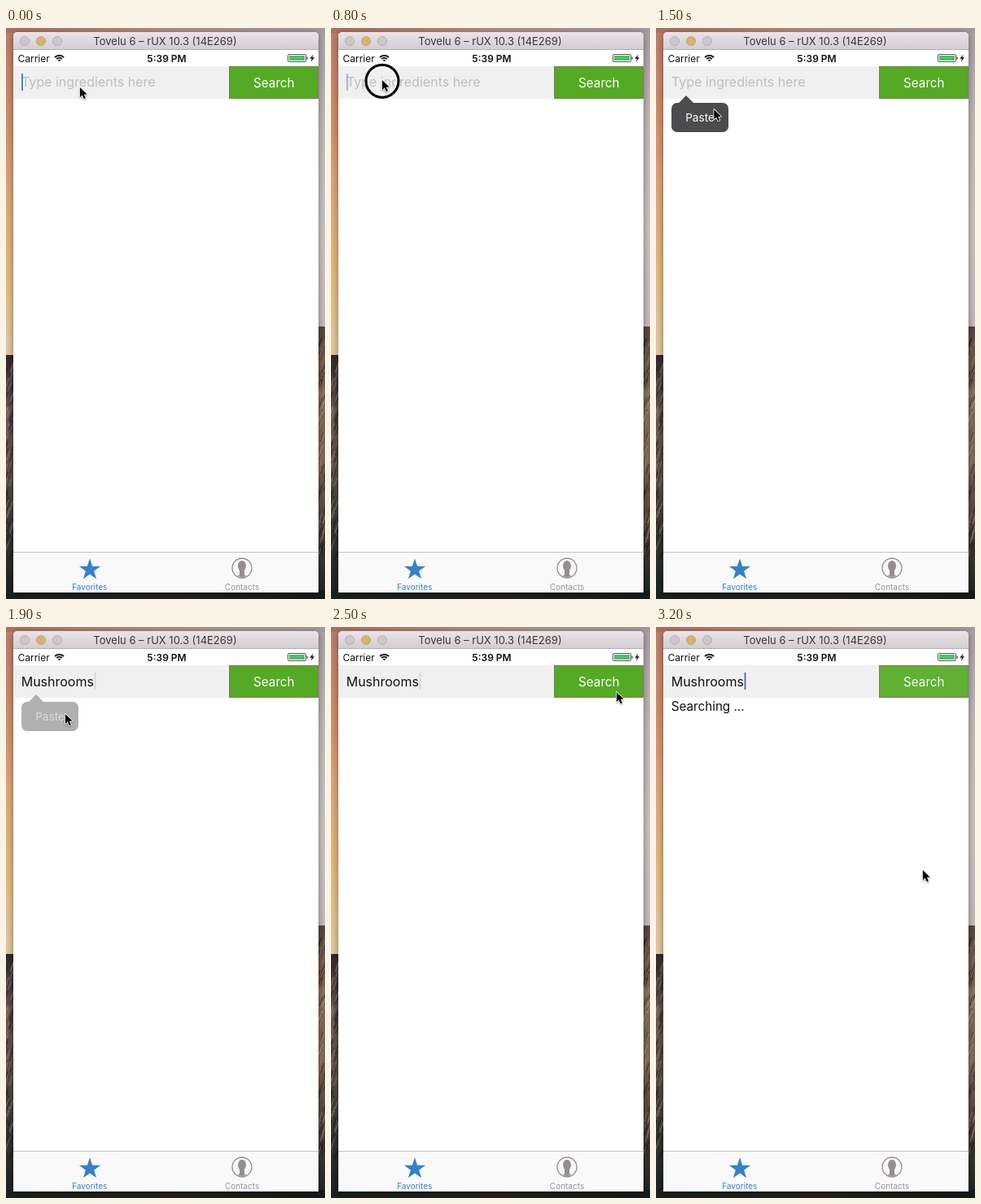
Recreate the animation shown at these times as an HTML page with a canvas. Size 392 by 702 pixels, loop 3300 ms.

```html
<!DOCTYPE html>
<html lang="en">
<head>
<meta charset="utf-8">
<title>Ingredient search</title>
<style>
  html, body { margin: 0; width: 100%; height: 100%; overflow: hidden; background: #fff; }
  canvas { display: block; width: 392px; height: 702px; }
</style>
</head>
<body>
<canvas id="stage"></canvas>
<script>
const W = 392, H = 702, LOOP = 3300, STEP = 100, TAU = Math.PI * 2;
const FONT = 'Inter, Roboto, "Liberation Sans", sans-serif';
const INK = '#111', BLUE = '#3581c8', GREY = '#958e8e';

// Moments of the story, in ms
const TAP = 800, MENU_IN = 1000, PASTE = 1900, PRESS = 2800, RESULT = 3000;

const dpr = window.devicePixelRatio || 1;
const canvas = document.getElementById('stage');
const base = document.createElement('canvas');
for (const c of [canvas, base]) {
  c.width = W * dpr;
  c.height = H * dpr;
}
const ctx = canvas.getContext('2d');

const clamp = v => Math.min(1, Math.max(0, v));
const ramp = (t, from, to) => clamp((t - from) / (to - from));
const ease = v => v * v * (3 - 2 * v);

function random(seed) {
  return () => (seed = seed * 16807 % 2147483647) / 2147483647;
}

function rect(c, color, x, y, w, h) {
  c.fillStyle = color;
  c.fillRect(x, y, w, h);
}

function round(c, color, x, y, w, h, r) {
  c.beginPath();
  c.roundRect(x, y, w, h, r);
  c.fillStyle = color;
  c.fill();
}

function disc(c, color, x, y, r) {
  c.beginPath();
  c.arc(x, y, r, 0, TAU);
  c.fillStyle = color;
  c.fill();
}

function ring(c, color, x, y, r, width) {
  c.beginPath();
  c.arc(x, y, r, 0, TAU);
  c.strokeStyle = color;
  c.lineWidth = width;
  c.stroke();
}

function poly(c, color, pts) {
  c.beginPath();
  pts.forEach(([x, y]) => c.lineTo(x, y));
  c.closePath();
  c.fillStyle = color;
  c.fill();
}

function text(c, str, x, y, size, color, align = 'left', weight = 400) {
  c.font = `${weight} ${size}px ${FONT}`;
  c.textAlign = align;
  c.fillStyle = color;
  c.fillText(str, x, y);
}

// Evenly spaced colours from one point to another
function blend(c, x0, y0, x1, y1, colors) {
  const g = c.createLinearGradient(x0, y0, x1, y1);
  colors.forEach((color, i) => g.addColorStop(i / (colors.length - 1), color));
  return g;
}

function side(c, x, horizon, sky, rock, rnd) {
  rect(c, blend(c, 0, 0, 0, horizon, sky), x, 0, W / 2, horizon);
  rect(c, blend(c, 0, horizon, 0, H, rock), x, horizon, W / 2, H - horizon);
  const edge = x ? 384 : 0;
  c.lineWidth = 1.4;
  for (let i = 0; i < 70; i++) {
    const sx = edge + rnd() * 8, sy = horizon + 12 + rnd() * (640 - horizon);
    c.strokeStyle = rnd() < .5 ? 'rgba(25,20,22,.45)' : 'rgba(190,165,140,.35)';
    c.beginPath();
    c.moveTo(sx - 2, sy + 7);
    c.lineTo(sx + 2, sy - 5);
    c.stroke();
  }
}

function wallpaper(c) {
  const rnd = random(41);
  side(c, 0, 402, ['#bb7c6c', '#cf8c68', '#e0a778', '#e4ba7c', '#e3c9a4'],
    ['#2f282a', '#665950', '#5a4f46', '#343630', '#17201f'], rnd);
  side(c, W / 2, 367, ['#aaa0a4', '#c4b9bb', '#cdc2c4', '#c6babd'],
    ['#55463f', '#846a56', '#7b6554', '#4a4038', '#1b2422'], rnd);
  rect(c, blend(c, 0, 0, W, 0, ['#a9705f', '#b08e84', '#a39a9e']), 0, 0, W, 6);
  rect(c, blend(c, 0, 0, W, 0, ['#18221f', '#25231f', '#141c1b']), 0, 692, W, 10);
}

function windowFrame(c) {
  const corners = [5, 5, 0, 0];
  c.save();
  c.shadowColor = 'rgba(0,0,0,.42)';
  c.shadowBlur = 8 * dpr;
  c.shadowOffsetY = 2 * dpr;
  round(c, '#fff', 9, 5, 375, 689, corners);
  c.restore();
  round(c, blend(c, 0, 5, 0, 27, ['#ebe4e9', '#d2ccd1']), 9, 5, 375, 22, corners);
  rect(c, '#b5afb3', 9, 26, 375, 1);
  ['#cdc6cb', '#d7b369', '#cdc6cb'].forEach((color, i) => {
    disc(c, color, 23 + i * 20, 16, 5.6);
    ring(c, 'rgba(90,75,80,.25)', 23 + i * 20, 16, 5.6, 1);
  });
  text(c, 'Tovelu 6 – rUX 10.3 (14E269)', 195.5, 21, 13, '#3a373a', 'center');
}

function statusBar(c) {
  text(c, 'Carrier', 14.5, 41.5, 12, INK);
  text(c, '5:39 PM', 197.5, 41.5, 12, INK, 'center', 600);

  c.strokeStyle = INK;
  c.lineWidth = 1.9;
  for (const r of [1.6, 4.7, 7.8]) {
    c.beginPath();
    c.arc(65.5, 41.5, r, TAU * .625, TAU * .875);
    c.stroke();
  }

  c.lineWidth = 1;
  c.strokeStyle = '#4d5a50';
  c.beginPath();
  c.roundRect(346.5, 32.5, 22, 9, 1.5);
  c.stroke();
  rect(c, '#50bd6a', 348, 34, 19, 6);
  rect(c, '#333', 369.5, 35.5, 1.2, 3);
  poly(c, INK, [[377.5, 32.5], [373.3, 37.8], [375.9, 37.8], [374.7, 41.8], [379, 36.3], [376.4, 36.3]]);
}

function tabBar(c) {
  rect(c, '#f9f9fa', 9, 644, 375, 50);
  rect(c, '#c3c1c3', 9, 644, 375, 1);

  const star = Array.from({ length: 10 }, (_, i) => {
    const a = i * TAU / 10, r = i % 2 ? 5.4 : 13.8;
    return [103 + r * Math.sin(a), 666 - r * Math.cos(a)];
  });
  poly(c, BLUE, star);
  text(c, 'Favorites', 102.7, 690.5, 10, BLUE, 'center');

  ring(c, GREY, 290, 664, 12, 1.3);
  c.save();
  c.beginPath();
  c.arc(290, 664, 11, 0, TAU);
  c.clip();
  c.fillStyle = GREY;
  c.beginPath();
  c.ellipse(290, 661.3, 5, 6.5, 0, 0, TAU);
  c.ellipse(290, 677, 9, 4.5, 0, 0, TAU);
  c.fill();
  rect(c, GREY, 287, 665, 6, 9);
  c.restore();
  text(c, 'Contacts', 290, 690.5, 10, '#979294', 'center');
}

// Everything that never changes is painted once
function paintBase() {
  const c = base.getContext('2d');
  c.scale(dpr, dpr);
  wallpaper(c);
  windowFrame(c);
  statusBar(c);
  tabBar(c);
  rect(c, '#f0f0f0', 9, 47, 265, 40);
}

function field(t) {
  const filled = t >= PASTE;
  if (filled) text(ctx, 'Mushrooms', 18.7, 73, 16, INK);
  else text(ctx, 'Type ingredients here', 19, 72, 16, '#c1bcc0');

  // The caret blinks once a second; pasting restarts it
  const phase = filled ? 200 : 50;
  ctx.globalAlpha = clamp(.5 + Math.cos((t - phase) / 1000 * TAU));
  rect(ctx, filled ? '#5666a0' : '#3e79bf', filled ? 108.6 : 19, 56, 1.8, 21);
  ctx.globalAlpha = 1;
}

function button(t) {
  const dim = ramp(t, PRESS, PRESS + 150) * (1 - ease(ramp(t, RESULT, RESULT + 250)));
  ctx.globalAlpha = 1 - .7 * dim;
  rect(ctx, '#54aa25', 274, 47, 110, 40);
  ctx.strokeStyle = '#7d7f52';
  ctx.lineWidth = 1;
  ctx.strokeRect(274.5, 47.5, 109, 39);
  text(ctx, 'Search', 329.3, 73, 15.2, '#fff', 'center');
  ctx.globalAlpha = 1;
}

function menu(t) {
  const fade = ramp(t, MENU_IN, MENU_IN + 220) * (1 - ramp(t, PASTE - 100, PASTE + 80));
  if (!fade) return;
  ctx.fillStyle = `rgba(45,45,47,${.85 * fade})`;
  ctx.beginPath();
  ctx.roundRect(19, 92, 70, 36, 7);
  ctx.moveTo(28, 92);
  ctx.lineTo(37, 83);
  ctx.lineTo(46, 92);
  ctx.fill();
  text(ctx, 'Paste', 54, 115, 13.6, `rgba(255,255,255,${clamp(1.3 * fade)})`, 'center');
}

// Each move eases from wherever the pointer was: start, end, x, y
const MOVES = [
  [0, 400, 62, 58], [400, 700, 62, 63], [1200, 1600, 72, 106],
  [1900, 2500, 350, 79], [2500, 2700, 325, 64], [2900, 3200, 327, 298]
];

function pointerAt(t) {
  return MOVES.reduce(([px, py], [from, to, x, y]) => {
    const k = ease(ramp(t, from, to));
    return [px + (x - px) * k, py + (y - py) * k];
  }, [90, 72]);
}

function pointer(t) {
  const [x, y] = pointerAt(t);
  if ([TAP, PASTE - 200, PRESS].some(at => t >= at && t < at + 200)) {
    ring(ctx, '#fff', x + 1, y + 2.3, 17.6, 1.6);
    ring(ctx, '#0a0a0a', x + 1, y + 2.3, 20, 3.2);
  }
  const arrow = [[0, 0], [0, 15], [3.4, 11.8], [6, 17.4], [8.6, 16.2], [6.1, 10.8], [10.6, 10.6]];
  ctx.save();
  ctx.translate(x + .9, y + .9);
  ctx.scale(.82, .82);
  ctx.shadowColor = 'rgba(0,0,0,.3)';
  ctx.shadowBlur = 2 * dpr;
  ctx.shadowOffsetY = dpr;
  ctx.lineJoin = 'round';
  ctx.lineWidth = 2;
  ctx.strokeStyle = '#fff';
  poly(ctx, '#000', arrow);
  ctx.stroke();
  ctx.shadowColor = 'transparent';
  poly(ctx, '#000', arrow);
  ctx.restore();
}

function draw(now) {
  const t = Math.floor(now % LOOP / STEP) * STEP;
  ctx.setTransform(1, 0, 0, 1, 0, 0);
  ctx.drawImage(base, 0, 0);
  ctx.setTransform(dpr, 0, 0, dpr, 0, 0);
  field(t);
  button(t);
  if (t >= RESULT) text(ctx, 'Searching ...', 18.8, 103, 15.2, INK);
  menu(t);
  pointer(t);
}

paintBase();
const start = performance.now();
function tick() {
  draw(performance.now() - start);
  requestAnimationFrame(tick);
}
tick();
</script>
</body>
</html>
```
